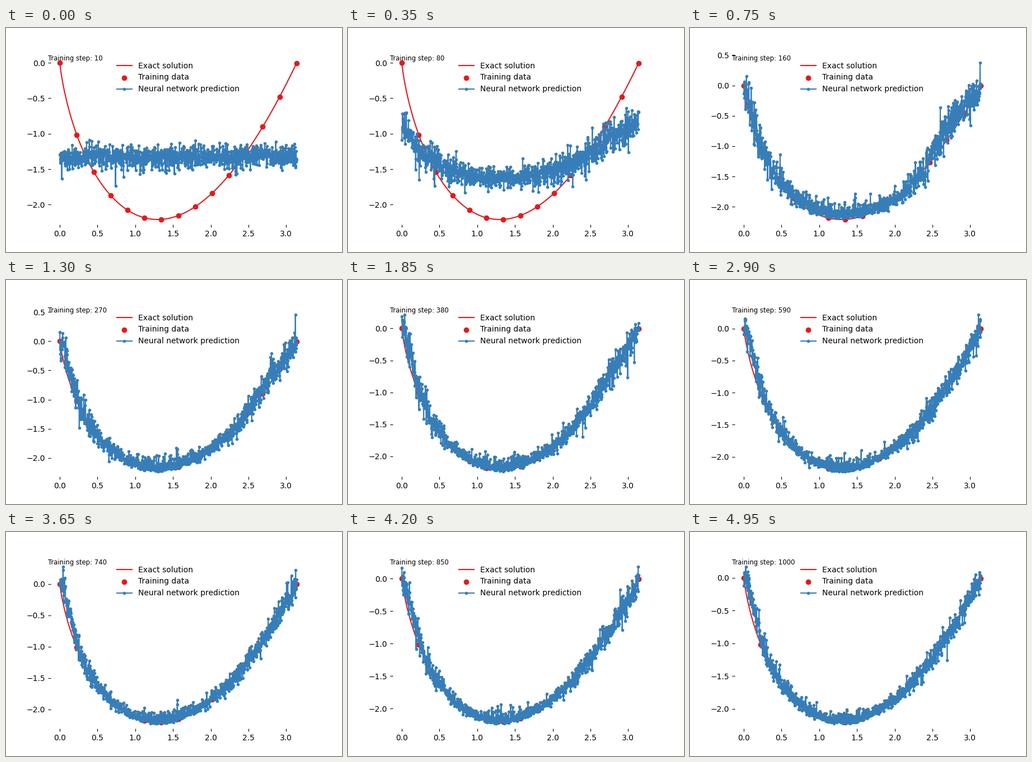
Animation of 600 by 400 pixels, one loop 5 s. Source, as a matplotlib script:

```python
import numpy as np
import matplotlib.pyplot as plt
from matplotlib.animation import FuncAnimation

FRAMES, INTERVAL = 100, 50
RED, BLUE = "#e41a1c", "#377eb8"

x = np.linspace(0, np.pi, 1000, endpoint=False)
x_train = np.linspace(0, x[-1], 15)
samples = [0, -1.016, -1.533, -1.87, -2.075, -2.186, -2.209, -2.154,
           -2.03, -1.838, -1.585, -1.27, -0.902, -0.48, -0.006]


def basis(v):
    """Terms of a curve with a logarithmic slope at zero."""
    log_term = v * np.log(np.maximum(v, 1e-12) / np.pi)
    return np.column_stack([log_term, v, v**2, v**3, v**4])


def bump(center, width):
    return np.exp(-((x - center) / width) ** 2)


coef = np.linalg.lstsq(basis(x_train), samples, rcond=None)[0]
exact = basis(x) @ coef
y_train = basis(x_train) @ coef
slope_weight = np.clip((np.abs(x - 1.35) - 0.2) / 0.8, 0, 1)
edge = (2 * x / np.pi - 1) ** 2


def predict(k):
    """Noisy network output: a flat guess that settles on the curve."""
    rng = np.random.default_rng(k + 1)
    s = min(k / 17, 1)
    learned = s * s * (3 - 2 * s)

    rounding = 1 - min(k / 30, 1) * np.exp(-(x / 0.12) ** 1.3)
    misfit = 0.26 * bump(2.75, 0.25) - 0.07 * bump(2, 0.3)
    fit = exact * rounding + misfit * np.exp(-abs(k - 15) / 14)
    mean = (1 - learned) * -1.32 + learned * fit

    sigma = 0.08 + 0.05 * learned * np.exp(-(k - 12) / 25)
    spread = sigma * (1 + learned * (0.5 * edge - 0.2))
    even = spread * rng.standard_t(20, x.size)
    skewed = 0.45 * sigma * rng.gamma(2, 1, x.size) - 0.03
    w = 1 - learned * (1 - slope_weight)
    return mean + w * even + (1 - w) * skewed


fig, ax = plt.subplots(figsize=(6, 4), dpi=100)
ax.plot(x, exact, color=RED, label="Exact solution")
ax.scatter(x_train, y_train, color=RED, label="Training data")
pred_line, = ax.plot(x, predict(0), ".-", color=BLUE,
                     label="Neural network prediction")
ax.legend(loc="upper center", frameon=False)
ax.tick_params(direction="in")
for spine in ax.spines.values():
    spine.set_visible(False)
step_text = ax.text(0, 1 - 10 / 308, "", transform=ax.transAxes,
                    fontsize="small")


def update(k):
    y = predict(k)
    pred_line.set_data(x, y)
    low = min(exact.min(), y.min())
    high = max(exact.max(), y.max())
    pad = 0.05 * (high - low)
    ax.set_ylim(low - pad, high + pad)
    step_text.set_text(f"Training step: {10 * (k + 1)}")
    return pred_line, step_text


anim = FuncAnimation(fig, update, frames=FRAMES, interval=INTERVAL,
                     repeat=True, repeat_delay=0)
plt.show()
```
